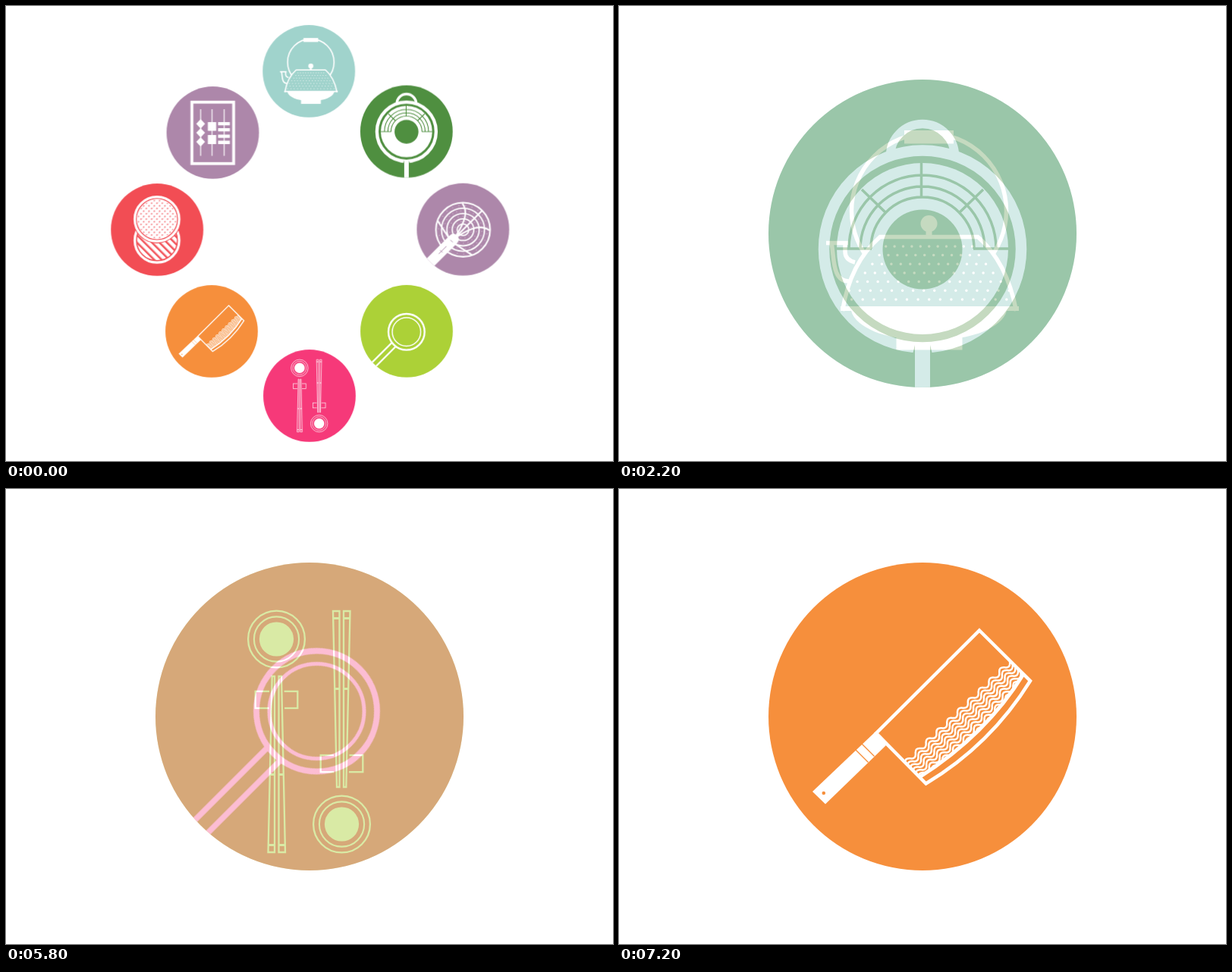
An HTML page that plays this animation: 800x600 px, repeating every 8000 ms.

```html
<!DOCTYPE html>
<html lang="en">
<head>
<meta charset="utf-8">
<title>Kitchen tools</title>
<style>
html, body { margin: 0; width: 100%; height: 100%; overflow: hidden; background: #fff; }
svg { display: block; width: 800px; height: 600px; }
.line { fill: none; stroke: #fff; }
.white { fill: #fff; }
.tint { fill: currentColor; }
.cut { fill: none; stroke: currentColor; }
.dots { fill: none; stroke: #fff; stroke-linecap: round; stroke-dasharray: 0 1; }

.overview { animation: leave 8s step-end infinite; }
.scene { opacity: 0; animation: show 8s step-end var(--at) infinite; }
.scene.last { animation-name: showLast; }
.scene .icon { animation: slide 8s step-end var(--at) infinite; }

@keyframes leave {
  0% { opacity: 1; }
  12.5% { opacity: .667; }
  13.75% { opacity: .333; }
  15%, 100% { opacity: 0; }
}
@keyframes show {
  0% { opacity: .333; }
  1.25% { opacity: .667; }
  2.5% { opacity: 1; }
  15% { opacity: .667; }
  16.25% { opacity: .333; }
  17.5%, 100% { opacity: 0; }
}
@keyframes showLast {
  0% { opacity: .333; }
  1.25% { opacity: .667; }
  2.5% { opacity: 1; }
  12.5%, 100% { opacity: 0; }
}
@keyframes slide {
  0% { transform: translate(calc(var(--dx) * -20px), calc(var(--dy) * -20px)); }
  1.25% { transform: translate(calc(var(--dx) * -10px), calc(var(--dy) * -10px)); }
  2.5% { transform: translate(0px, 0px); }
  15% { transform: translate(calc(var(--dx) * 10px), calc(var(--dy) * 10px)); }
  16.25%, 100% { transform: translate(calc(var(--dx) * 20px), calc(var(--dy) * 20px)); }
}
</style>
</head>
<body>
<svg id="stage" viewBox="0 0 800 600">
  <defs>
    <clipPath id="disc"><circle r="203"/></clipPath>

    <g id="kettle"><g transform="translate(-400 -280)">
      <circle class="line" cx="408.5" cy="240" r="102" stroke-width="5.5"/>
      <rect class="white" x="376" y="134" width="65" height="17.5"/>
      <path class="line" stroke-width="5.5" d="M273 282.5H302M280 283C284 300 280 333 303 333M298 283V294C298 302 303 306 311 308"/>
      <path class="tint" stroke="#fff" stroke-width="5.5" d="M294.500 372C301 332 317 298 344 274.500H473C500 298 516 332 523.500 372"/>
      <circle class="white" cx="408.500" cy="257" r="11"/>
      <rect class="white" x="404.500" y="265" width="8" height="9"/>
      <path class="white" d="M292 366H527V372H511C505 395 462 409 432 409H385C355 409 312 395 306 372H292Z"/>
      <rect class="white" x="365.500" y="404" width="87" height="19.500"/>
      <path id="holes" stroke="#fff" stroke-width="3.500" stroke-linecap="round"/>
    </g></g>

    <g id="wok">
      <path class="line" stroke-width="11.500" d="M-42.500 -122A42.500 42.500 0 0 1 42.500 -122V-121"/>
      <circle class="line" r="130" cy=".5" stroke-width="14.500"/>
      <circle class="white" r="113"/>
      <path class="cut" stroke-width="3.500" d="M-97 0A97 97 0 0 1 97 0M-82 0A82 82 0 0 1 82 0M-68 0A68 68 0 0 1 68 0M-114 0H-67M67 0H114M-1.500 -113V-68M-80 -78L-49 -48M80 -78L49 -48"/>
      <circle class="tint" r="52.500" cy="1"/>
      <path class="tint" d="M-10 127L-13 139H13L10 127Z"/>
      <rect class="white" x="-10" y="127" width="20" height="90"/>
    </g>

    <g id="skimmer"><g transform="translate(0 1) rotate(-45)">
      <g class="line" stroke-width="6">
        <circle r="119" stroke-width="7"/>
        <circle r="94.500"/><circle r="71"/><circle r="47.500"/><circle r="25.500"/>
        <path stroke-width="7" d="M-45 0H118M-40 -3C35 -20 72 -40 80 -84M-40 3C35 20 72 40 80 84M-51 -107L-69 -20M-51 107L-69 20"/>
      </g>
      <g class="dots" stroke-width="2.400">
        <circle r="107" pathLength="23" transform="rotate(-7.800)"/>
        <circle r="83.500" pathLength="28" transform="rotate(-1.600)"/>
        <circle r="59.500" pathLength="18" transform="rotate(-7)"/>
        <circle r="37" pathLength="12"/>
      </g>
      <path class="white" d="M-240 -23.500H-60Q-38 -22 -38 -6L-22 -4V4L-38 6Q-38 22 -60 23.500H-240Z"/>
      <path class="cut" stroke-width="3" d="M-71 -7V7M-151 0H-103M-134.500 -7V7"/>
    </g></g>

    <g id="strainer"><g class="line" transform="translate(-.5 3) rotate(-45)">
      <circle r="79.500" stroke-width="8"/>
      <circle r="62.500" stroke-width="5"/>
      <path stroke-width="7.500" d="M-240 -12H-80M-240 12H-80"/>
    </g></g>

    <g id="setting"><g transform="translate(-400 -300)">
      <circle class="line" cx="356.500" cy="178" r="37.400" stroke-width="2.300"/>
      <circle class="line" cx="356.500" cy="178" r="29.600" stroke-width="2.100"/>
      <circle class="white" cx="356.500" cy="178" r="22.600"/>
      <rect class="line" x="328.700" y="246.800" width="55.600" height="22.200" stroke-width="2.300"/>
      <path class="tint" stroke="currentColor" stroke-width="6" d="M350.500 227H363.200L368 459H345.500Z"/>
      <path class="line" stroke-width="2.300" d="M350.700 227H354V459H345.500ZM359.500 227H363L368 459H359.500Z"/>
      <path class="line" stroke-width="3" d="M346 449.500H354M359.500 449.500H368M348 356.500H354M359.500 356.500H366"/>
    </g></g>
    <g id="chopsticks">
      <use href="#setting"/>
      <use href="#setting" transform="rotate(180 -.5 0)"/>
    </g>

    <clipPath id="blade"><path d="M475 186L533 244Q484 324 396 380L339 322Z"/></clipPath>
    <g id="knife"><g transform="translate(-400 -300)">
      <g clip-path="url(#blade)"><path id="waves" class="line" stroke-width="2.500" transform="translate(377 362) rotate(-44)"/></g>
      <path class="line" stroke-width="4.500" d="M475 186.500L542 253Q490 337 404.500 388.500L339 322Z"/>
      <path class="line" stroke-width="5" d="M533 244Q484 324 396 380"/>
      <path class="white" d="M255 399L338 320L353 337L272 415.500Z"/>
      <path class="cut" stroke-width="1.400" d="M311.500 343.500L328.500 360.500M319.500 335.500L336.500 352.500"/>
      <circle class="tint" cx="269.800" cy="401" r="2.300"/>
    </g></g>

    <g id="abacus"><g transform="scale(3.333) translate(-272.500 -167)">
      <rect class="line" x="245" y="126.800" width="55" height="81" stroke-width="3.800"/>
      <path class="line" stroke-width="1.200" d="M256.500 136V197.500M271.500 136V197.500M287.500 136V197.500"/>
      <path class="white" d="M256.500 149L262.300 155.300L256.500 161.500L250.700 155.300ZM256.500 161L262.300 167.200L256.500 173.400L250.700 167.200ZM256.500 173L262.300 179.200L256.500 185.400L250.700 179.200Z"/>
      <path class="white" d="M266 153H277V164.500H266ZM266 170H277V182H266ZM279.500 153H295V157.300H279.500ZM279.500 161H295V165.300H279.500ZM279.500 169.500H295V173.800H279.500ZM279.500 177.700H295V182H279.500Z"/>
    </g></g>

    <pattern id="weave" width="11" height="11" patternUnits="userSpaceOnUse" patternTransform="translate(199 281) rotate(45) scale(.9)">
      <path class="line" stroke-width="3.800" d="M-.8 2.750h7m4 0h1M4.700 8.250h7M0 8.250h.8M8.250 -.8v7m0 4v1M2.750 4.700v7M2.750 0v.8"/>
    </pattern>
    <pattern id="slats" width="20" height="7" patternUnits="userSpaceOnUse" patternTransform="translate(199 309) rotate(45)">
      <rect class="white" y="1" width="20" height="4.500"/>
    </pattern>
    <g id="steamer"><g transform="scale(3.333) translate(-199.200 -295)">
      <circle class="line" cx="199" cy="309" r="29.300" stroke-width="3.200"/>
      <circle cx="199" cy="309" r="26.200" fill="url(#slats)"/>
      <circle class="tint" cx="199" cy="281" r="32"/>
      <circle class="line" cx="199" cy="281" r="29.300" stroke-width="3.200"/>
      <circle cx="199" cy="281" r="26.300" fill="url(#weave)"/>
      <circle class="line" cx="199" cy="281" r="26" stroke-width="1"/>
    </g></g>
  </defs>
</svg>
<script>
const stage = document.getElementById('stage');

// x, y: place in the overview; dx, dy: slide direction of the large view
const tools = [
  { id: 'kettle', color: '#a0d3cc', x: 399.2, y: 86, dx: 0, dy: 1 },
  { id: 'wok', color: '#4f8f40', x: 527.8, y: 165.5, dx: 0, dy: -1 },
  { id: 'skimmer', color: '#ad87aa', x: 602.3, y: 294.6, dx: 1, dy: -1 },
  { id: 'strainer', color: '#acd137', x: 528, y: 428.8, dx: 1, dy: -1 },
  { id: 'chopsticks', color: '#f63979', x: 400, y: 514, dx: 0, dy: -1 },
  { id: 'knife', color: '#f68f3c', x: 271, y: 429, dx: 1, dy: -1 },
  { id: 'steamer', color: '#f24d54', x: 199.2, y: 295 },
  { id: 'abacus', color: '#ad87aa', x: 272.5, y: 167 }
];

// Lid holes: seven rows that fan out towards the rim
let holes = '';
for (let row = 0; row < 7; row++) {
  const gap = 11.4 + row * 0.53;
  const count = row < 6 ? 11 + row : 15;
  for (let i = 0; i < count; i++) {
    const x = 408.7 + (i - (count - 1) / 2) * gap;
    holes += `M${x.toFixed(1)} ${(287 + row * 11.65).toFixed(1)}h0`;
  }
}
document.getElementById('holes').setAttribute('d', holes);

// Blade pattern: parallel wavy lines
let waves = '';
for (let row = 0; row < 9; row++) {
  waves += `M0 ${row * 5.2}q4.8 -6 9.6 0` + 't9.6 0'.repeat(22);
}
document.getElementById('waves').setAttribute('d', waves);

const badge = id =>
  `<circle class="tint" r="203"/><g clip-path="url(#disc)"><g class="icon"><use href="#${id}"/></g></g>`;

const scenes = tools.slice(0, 6).map((t, i) =>
  `<g class="scene${i === 5 ? ' last' : ''}" color="${t.color}"
    style="--at:${1000 + i * 1200 - 8000}ms;--dx:${t.dx};--dy:${t.dy}">
    <g transform="translate(400 300)">${badge(t.id)}</g></g>`);

const minis = tools.map(t =>
  `<g color="${t.color}" transform="translate(${t.x} ${t.y}) scale(.3)">${badge(t.id)}</g>`);

stage.insertAdjacentHTML('beforeend',
  scenes.join('') + `<g class="overview">${minis.join('')}</g>`);
</script>
</body>
</html>
```
